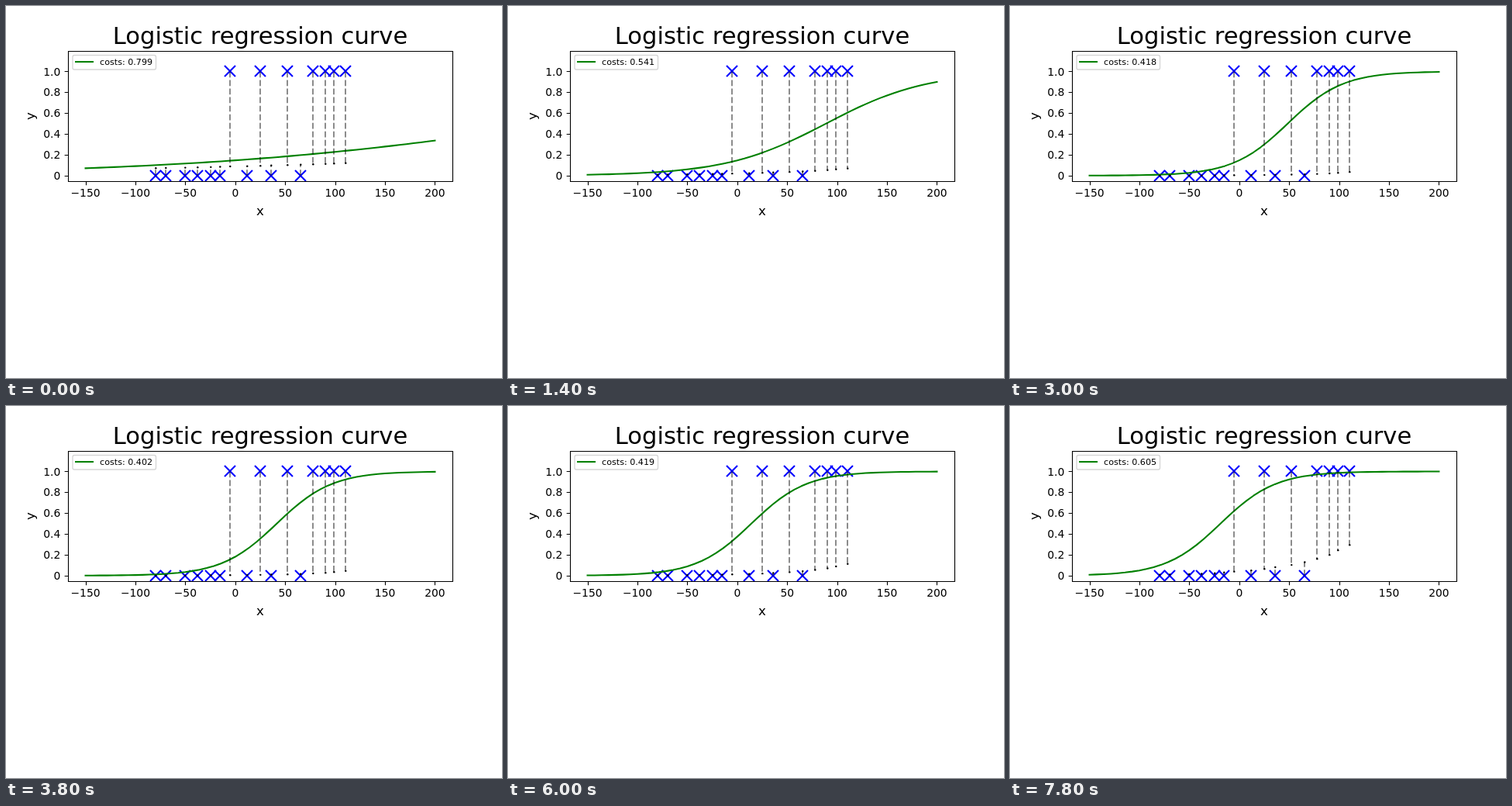
An HTML page with a canvas that plays this animation: 640x480 px, repeating every 8000 ms.

```html
<!DOCTYPE html>
<html lang="en">
<head>
<meta charset="utf-8">
<title>Logistic regression curve</title>
<style>
  html, body { margin: 0; width: 100%; height: 100%; overflow: hidden; background: #fff; }
  canvas { display: block; }
</style>
</head>
<body>
<canvas id="stage" width="640" height="480"></canvas>
<script>
const ctx = document.getElementById('stage').getContext('2d');

const LOOP = 8000, STEP = 200;
const LEFT = 80, RIGHT = 576, TOP = 57.6, BOTTOM = 225.6;
const SAMPLES = 50;
const LINE = 2.08;

const zeros = [-80, -70, -50, -38, -25, -15, 12, 36, 65];
const ones = [-5, 25, 52, 78, 90, 99, 110];
const points = [...zeros.map(x => ({ x, y: 0 })), ...ones.map(x => ({ x, y: 1 }))]
  .sort((a, b) => a.x - b.x);

const px = x => LEFT + (x + 167.5) * (RIGHT - LEFT) / 385;
const py = y => BOTTOM - (y + 0.05) * (BOTTOM - TOP) / 1.25;
const whole = v => Math.floor(v + 0.5);
const crisp = v => whole(v) + 0.5;
const sigmoid = z => 1 / (1 + Math.exp(-z));
const sampleX = i => -150 + 350 * i / (SAMPLES - 1);

// The slope grows first, then the intercept moves through these [step, value] knots.
const interceptKnots = [[0, -1.76], [15, -1.76], [26, -1.07], [34, 0.039], [39, 0.677]];

function interpolate(knots, k) {
  for (let i = 1; i < knots.length; i++) {
    const [k0, v0] = knots[i - 1], [k1, v1] = knots[i];
    if (k <= k1) return v0 + (v1 - v0) * (k - k0) / (k1 - k0);
  }
  return knots[knots.length - 1][1];
}

function model(k) {
  const w = 0.0054 + 0.002055 * Math.min(k, 15);
  const b = interpolate(interceptKnots, k);
  return x => sigmoid(w * x + b);
}

function meanCost(predict) {
  const total = points.reduce((sum, { x, y }) => {
    const p = predict(x);
    return sum - Math.log(y ? p : 1 - p);
  }, 0);
  return total / points.length;
}

function text(str, x, y, size, align = 'center') {
  ctx.font = `${size}px "DejaVu Sans", sans-serif`;
  ctx.textAlign = align;
  ctx.fillStyle = '#000';
  ctx.fillText(str, x, y);
}

function stroke(color, width, path) {
  ctx.strokeStyle = color;
  ctx.lineWidth = width;
  ctx.beginPath();
  path();
  ctx.stroke();
}

function segment(x0, y0, x1, y1) {
  ctx.moveTo(x0, y0);
  ctx.lineTo(x1, y1);
}

function drawAxes() {
  const l = crisp(LEFT), r = crisp(RIGHT), t = crisp(TOP), b = crisp(BOTTOM);
  stroke('#000', 1.11, () => {
    ctx.rect(l, t, r - l, b - t);
    for (let x = -150; x <= 200; x += 50) segment(crisp(px(x)), b, crisp(px(x)), b + 4.86);
    for (let i = 0; i <= 5; i++) segment(l - 4.86, crisp(py(i / 5)), l, crisp(py(i / 5)));
  });
  for (let x = -150; x <= 200; x += 50) {
    text(String(x).replace('-', '\u2212'), px(x), 246, 13.89);
  }
  for (let i = 0; i <= 5; i++) {
    text(i ? (i / 5).toFixed(1) : '0', 70.3, whole(py(i / 5) + 5.1), 13.89, 'right');
  }
  text('Logistic regression curve', 328, 49, 30.56);
  text('x', 328, 270, 16.67);
  ctx.save();
  ctx.translate(36.5, 142);
  ctx.rotate(-Math.PI / 2);
  text('y', 0, 0, 16.67);
  ctx.restore();
}

function drawPlot(predict) {
  ctx.save();
  ctx.beginPath();
  ctx.rect(LEFT, TOP, RIGHT - LEFT, BOTTOM - TOP + 0.4);
  ctx.clip();

  for (const { x, y } of points) {
    const cx = whole(px(x)), cy = whole(py(y));
    stroke('#00f', LINE, () => {
      segment(cx - 7, cy - 7, cx + 7, cy + 7);
      segment(cx - 7, cy + 7, cx + 7, cy - 7);
    });
  }

  ctx.lineJoin = 'round';
  ctx.lineCap = 'square';
  stroke('#008000', LINE, () => {
    for (let i = 0; i < SAMPLES; i++) {
      const x = sampleX(i);
      ctx.lineTo(px(x), py(predict(x)));
    }
  });
  ctx.lineCap = 'butt';
  ctx.lineJoin = 'miter';

  // Each guide ends at the curve sample with the same index as its point.
  points.forEach(({ x, y }, i) => {
    const cx = whole(px(x)), end = py(predict(sampleX(i)));
    ctx.setLineDash([7.71, 3.33]);
    stroke('rgba(0,0,0,0.45)', 2, () => segment(cx, py(y), cx, end));
    ctx.setLineDash([]);
    ctx.fillStyle = '#000';
    ctx.beginPath();
    ctx.arc(cx + 0.3, end, 1.2, 0, 2 * Math.PI);
    ctx.fill();
  });
  ctx.restore();
}

function drawLegend(cost) {
  ctx.beginPath();
  ctx.roundRect(86, 63.5, 107.5, 18.5, 2.2);
  ctx.fillStyle = 'rgba(255,255,255,0.8)';
  ctx.fill();
  ctx.strokeStyle = 'rgba(204,204,204,0.8)';
  ctx.lineWidth = 1.39;
  ctx.stroke();
  stroke('#008000', LINE, () => segment(89, 72, 113, 72));
  text(`costs: ${cost.toFixed(3)}`, 121.1, 76, 11.11, 'left');
}

function render(time) {
  const predict = model(Math.floor((time % LOOP) / STEP));
  ctx.fillStyle = '#fff';
  ctx.fillRect(0, 0, 640, 480);
  drawPlot(predict);
  drawAxes();
  drawLegend(meanCost(predict));
}

const start = performance.now();
function tick() {
  render(performance.now() - start);
  requestAnimationFrame(tick);
}
tick();
</script>
</body>
</html>
```
